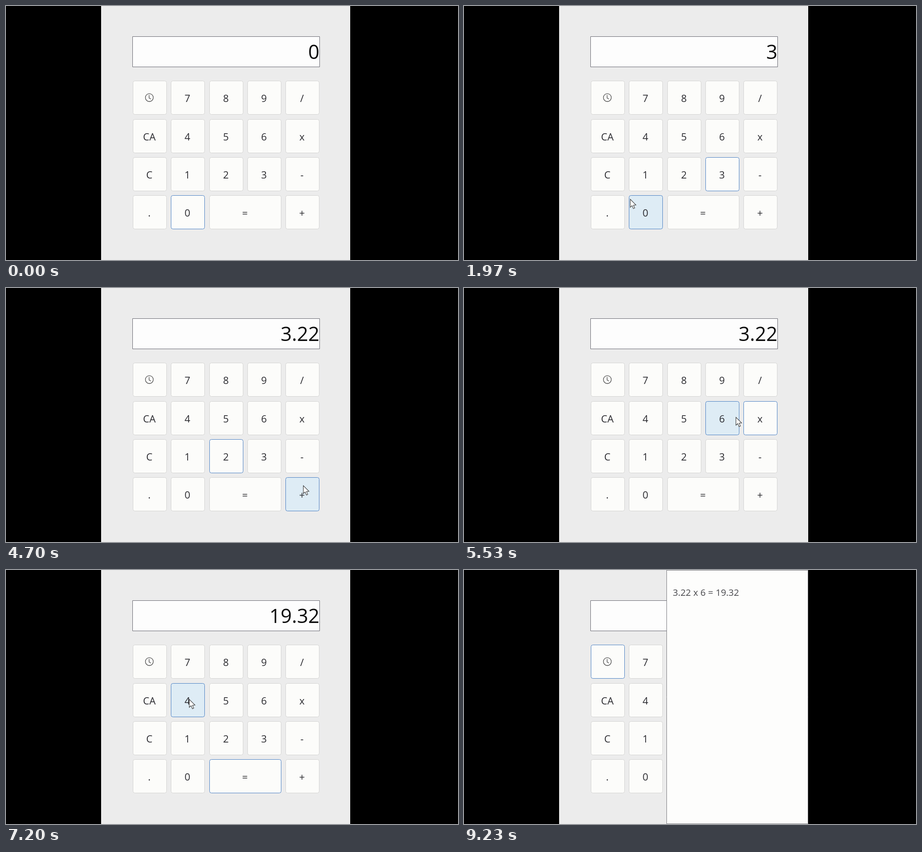
Write an HTML page with a canvas that moves like this. It is 998 px wide and 561 px high and loops after 9.4 s.

```html
<!DOCTYPE html>
<html lang="en">
<head>
<meta charset="utf-8">
<title>Calculator</title>
<style>
html, body { margin: 0; width: 100%; height: 100%; overflow: hidden; background: #000; }
canvas { display: block; }
</style>
</head>
<body>
<canvas id="stage" width="998" height="561"></canvas>
<script>
const ctx = document.getElementById('stage').getContext('2d');
const LOOP = 9400;
const FONT = '"Open Sans", "Noto Sans", sans-serif';
const BLUE = '#4a80c4';
const PITCH = 84.3, SIZE = 75;
const TRAVEL = 450;       // usual time between two stops
const PRESS_DELAY = 150;  // from arriving on a key to pressing it
const PANEL_X = 447;

// Keypad: "H" is the history key, "=" spans two columns.
const keys = [];
['H789/', ['CA', '4', '5', '6', 'x'], 'C123-', '.0= +'].forEach((row, r) => {
  [...row].forEach((label, c) => {
    if (label === ' ') return;
    keys.push({
      label,
      x: Math.round(280 + c * PITCH),
      y: Math.round(165.3 + r * PITCH),
      w: label === '=' ? Math.round(SIZE + PITCH) : SIZE,
      h: SIZE
    });
  });
});

// Pointer stops; those with a key press it and leave the given display.
const stops = [
  { at: 130, x: 216, y: 2 },
  { at: 650, x: 686, y: 475 },
  { at: 1250, x: 574, y: 372, key: '3', shown: '3' },
  { at: 2100, x: 315, y: 440, key: '.', shown: '3.' },
  { at: 3200, x: 474, y: 366, key: '2', shown: '3.2' },
  { at: 3930, x: 474, y: 366, key: '2', shown: '3.22' },
  { at: 4700, x: 656, y: 436 },
  { at: 5200, x: 658, y: 285, key: 'x', shown: '3.22' },
  { at: 5700, x: 573, y: 285, key: '6', shown: '6' },
  { at: 6350, x: 541, y: 450, key: '=', shown: '19.32' },
  { at: 7380, x: 331, y: 197, key: 'H', shown: '19.32' },
  { at: 8100, x: 591, y: 44, travel: 130 },
  { at: 8570, x: 400, y: 460, travel: 270 },
  { at: 8830, x: 519, y: 274 },
  { at: 9160, x: 302, y: 52, travel: 30 }
];
const HIDE = 9230;

const ease = u => u * u * (3 - 2 * u);

function pointer(t) {
  if (t < stops[0].at || t >= HIDE) return null;
  const n = stops.findIndex(s => s.at > t);
  if (n < 0) return stops[stops.length - 1];
  const from = stops[n - 1], to = stops[n];
  const leave = Math.max(from.at, to.at - (to.travel || TRAVEL));
  const k = ease(Math.max(0, (t - leave) / (to.at - leave)));
  return { x: from.x + (to.x - from.x) * k, y: from.y + (to.y - from.y) * k };
}

function lastPress(t) {
  const done = stops.filter(s => s.key && s.at + PRESS_DELAY <= t);
  return done.pop() || { key: '0', shown: '0' };
}

function box(x, y, w, h, radius, fill, stroke) {
  ctx.beginPath();
  ctx.roundRect(x + 0.5, y + 0.5, w - 1, h - 1, radius);
  ctx.fillStyle = fill;
  ctx.fill();
  ctx.strokeStyle = stroke;
  ctx.lineWidth = 1;
  ctx.stroke();
}

function text(str, x, y, size, align, color) {
  ctx.font = `${size}px ${FONT}`;
  ctx.textAlign = align;
  ctx.fillStyle = color;
  ctx.fillText(str, x, y);
}

function clock(x, y) {
  ctx.strokeStyle = '#484848';
  ctx.lineWidth = 1.3;
  ctx.beginPath();
  ctx.arc(x, y, 8.7, 0, Math.PI * 2);
  ctx.moveTo(x - 0.5, y - 5.5);
  ctx.lineTo(x - 0.5, y + 1);
  ctx.lineTo(x + 3.5, y + 3.2);
  ctx.stroke();
}

function drawKey(key, hover, focus) {
  const fill = hover ? '#deecf5' : '#fcfcfa';
  box(key.x, key.y, key.w, key.h, 4, fill, hover || focus ? BLUE : '#d3d3d2');
  const cx = key.x + key.w / 2 - 1;
  if (key.label === 'H') clock(cx, key.y + 37.3);
  else text(key.label, cx, key.y + 47.4, 22, 'center', '#2b2b30');
}

function drawArrow(p) {
  ctx.save();
  ctx.translate(p.x + 0.5, p.y + 0.5);
  const arrow = new Path2D('M0 0V17.5L4 14L6.8 20.7L9.8 19.4L7 13L12.5 12.6Z');
  ctx.fillStyle = '#fff';
  ctx.fill(arrow);
  ctx.strokeStyle = '#333';
  ctx.lineWidth = 1.1;
  ctx.stroke(arrow);
  ctx.restore();
}

function draw(t) {
  const { key: focus, shown } = lastPress(t);
  const open = focus === 'H';
  const p = pointer(t);
  const over = k => p && !(open && p.x >= PANEL_X) &&
    p.x >= k.x && p.x < k.x + k.w && p.y >= k.y && p.y < k.y + k.h;

  ctx.fillStyle = '#000';
  ctx.fillRect(0, 0, 998, 561);
  ctx.fillStyle = '#ececec';
  ctx.fillRect(210, 0, 550, 561);

  box(279, 67, 414, 68, 0, '#fdfdfd', '#65656f');
  text(shown, 692, 117, 43.3, 'right', '#0c0c0c');
  keys.forEach(k => drawKey(k, over(k), k.label === focus));

  if (open) {
    box(PANEL_X, 0, 313, 561, 0, '#fdfdfc', '#77777c');
    text('3.22 x 6 = 19.32', 461, 57.4, 20.2, 'left', '#48484c');
  }
  if (p) drawArrow(p);
}

function tick() {
  draw(performance.now() % LOOP);
  requestAnimationFrame(tick);
}
tick();
</script>
</body>
</html>
```
